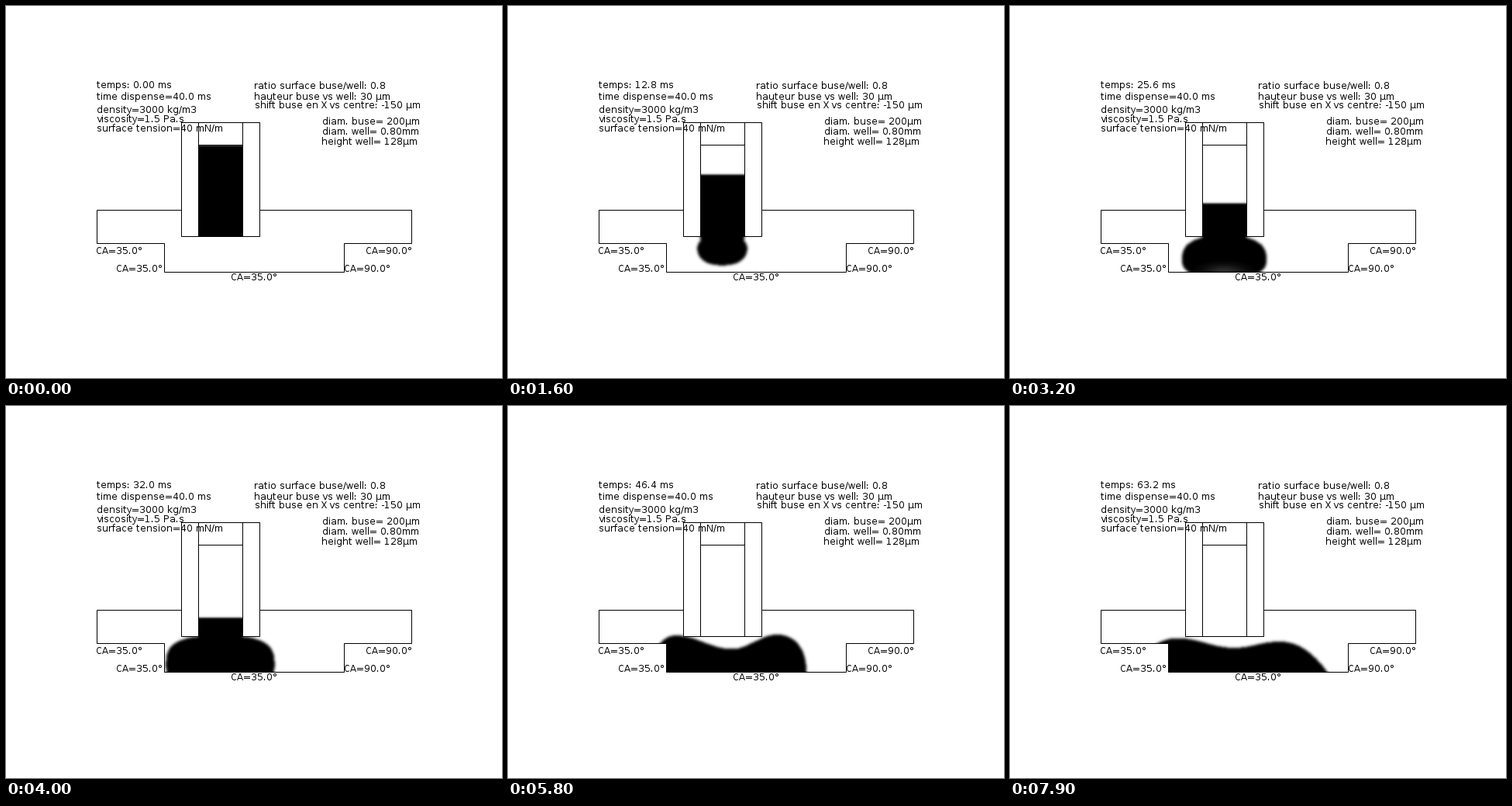
A matplotlib script that plays this animation: 640x480 px, repeating every 8000 ms.

```python
import numpy as np
import matplotlib.pyplot as plt
from matplotlib.animation import FuncAnimation

FRAMES, STEP = 80, 100
PX = 0.9  # one pixel in points at 80 dpi
MID = 276.5  # nozzle axis
TIP, FLOOR = 297, 343  # nozzle mouth and bottom of the well

# Whole-pixel glyph advances
plt.rcParams.update({"font.family": "DejaVu Sans", "text.hinting": "default",
                     "text.hinting_factor": 1})
fig = plt.figure(figsize=(8, 6), dpi=80, facecolor="white")
ax = fig.add_axes([0, 0, 1, 1])
ax.axis("off")

# Pixel grid that holds the fluid
X0, X1, Y0, Y1 = 170, 430, 170, 360
gx, gy = np.meshgrid(np.arange(X0, X1) + 0.5, np.arange(Y0, Y1) + 0.5)
bore = (gx > 248) & (gx < 306) & (gy < TIP) & (gy > 179)
beside = ((gx < 226) | (gx > 328)) & (gy < TIP)
room = (gy < FLOOR) & ((gx > 204) | (gy < 306)) & (bore | beside | (gy >= TIP))


def blur(mask, sigma):
    k = np.exp(-0.5 * (np.arange(-6, 7) / sigma) ** 2)
    img = mask.astype(float)
    for axis in (0, 1):
        img = np.apply_along_axis(np.convolve, axis, img, k / k.sum(), "same")
    return img


def wave(u):
    return 0.5 - 0.5 * np.cos(np.pi * np.clip(u, 0, 1))


def drop(t):
    """Superellipse that swells and sinks below the nozzle."""
    cy = TIP + 9.5 * t
    radius = 28.5 + 8 * max(t - 1, 0) ** 1.5
    power = 2.3 + 1.7 * (t / 5) ** 4
    below = 24 * (1 - np.exp(-t / 0.6)) + 0.1
    above = cy - TIP + 0.5
    s = np.clip(np.abs(gy - cy) / np.where(gy > cy, below, above), 0, 1)
    dx = np.abs(gx - MID)
    neck = (dx < 29) & (gy < min(cy, 302))
    return neck | (dx < radius * (1 - s**power) ** (1 / power))


def pool(t):
    """Surface with two crests and a trough that relaxes once dosing stops."""
    sag = min((t - 5) / 0.8, 1)
    relax = 1 - (1 - max(t - 5.8, 0) / 2.1) ** 1.9
    xl, yl = 216, 296 + 3.5 * relax
    xm, ym = 289, TIP + 16.5 * sag - 1.5 * relax
    xr, yr = 347, 295 + 9 * relax
    start = 196 - 5 * relax
    foot = 370 + 15 * sag + 25 * relax

    left = yl + (306 - yl) * ((xl - gx) / (xl - start)) ** 2
    dip = np.where(gx < xm, yl + (ym - yl) * wave((gx - xl) / (xm - xl)),
                   yr + (ym - yr) * wave((xr - gx) / (xr - xm)))
    u = np.clip((gx - xr) / (foot - xr), 0, 1)
    front = yr + (FLOOR + 1 - yr) * (1 - (1 - u**2.2) ** (0.43 + 0.57 * relax))
    top = np.where(gx < xl, left, np.where(gx < xr, dip, front))
    return (gy > top) & (gx < foot)


def fluid(t):
    if t >= 5:
        return room * blur(pool(t), 1.8)
    sigma = 1.8 * min(1, 0.3 + 2 * t)
    column = 0.5 + 0.5 * np.tanh((gy - 180.3 - 23.2 * t) / sigma / 0.8)
    img = column * np.where(bore, 1, blur(drop(t), sigma))
    # thin air film caught under the drop
    film = np.exp(-((gx - MID) / 25) ** 2 - ((gy - FLOOR) / 9) ** 2)
    img = img - 0.2 * film * np.exp(-((t - 3.1) / 0.35) ** 2)
    return room * np.clip(img, 0, 1)


def line(*pts):
    x, y = np.array(pts).T
    ax.plot(x, y, color="black", lw=PX, solid_capstyle="projecting",
            solid_joinstyle="miter", snap=True, zorder=2)


def label(x, y, s):
    return ax.text(x, y, s, fontsize=12 * PX, color="black", va="baseline", zorder=3)


image = ax.imshow(fluid(0), cmap="gray_r", vmin=0, vmax=1, extent=(X0, X1, Y1, Y0),
                  interpolation="nearest", aspect="auto", zorder=1)
ax.set_xlim(0, 640)
ax.set_ylim(480, 0)

line((226, 263), (117, 263), (117, 306), (204, 306), (204, FLOOR), (436, FLOOR),
     (436, 306), (523, 306), (523, 263), (327, 263))
line((226, 150), (327, 150), (327, TIP), (226, TIP), (226, 150))
line((248, 150), (248, TIP))
line((305, 150), (305, TIP))
line((248, 179), (305, 179))

clock = label(117, 106, "")
for x, y, s in [
    (117, 121, "time dispense=40.0 ms"),
    (117, 138, "density=3000 kg/m3"),
    (117, 150, "viscosity=1.5 Pa.s"),
    (117, 162, "surface tension=40 mN/m"),
    (320, 107, "ratio surface buse/well: 0.8"),
    (320, 121, "hauteur buse vs well: 30 µm"),
    (321, 132, "shift buse en X vs centre: -150 µm"),
    (408, 153, "diam. buse= 200µm"),
    (408, 166, "diam. well= 0.80mm"),
    (407, 179, "height well= 128µm"),
    (116, 320, "CA=35.0°"),
    (142, 343, "CA=35.0°"),
    (290, 354, "CA=35.0°"),
    (464, 320, "CA=90.0°"),
    (436, 343, "CA=90.0°"),
]:
    label(x, y, s)


def update(i):
    ms = 0.8 * i
    clock.set_text(f"temps: {ms:.2f} ms" if ms < 9.99 else f"temps: {ms:.1f} ms")
    image.set_data(fluid(i * STEP / 1000))
    return image, clock


anim = FuncAnimation(fig, update, frames=FRAMES, interval=STEP, repeat=True,
                     repeat_delay=0, blit=False)
plt.show()
```
